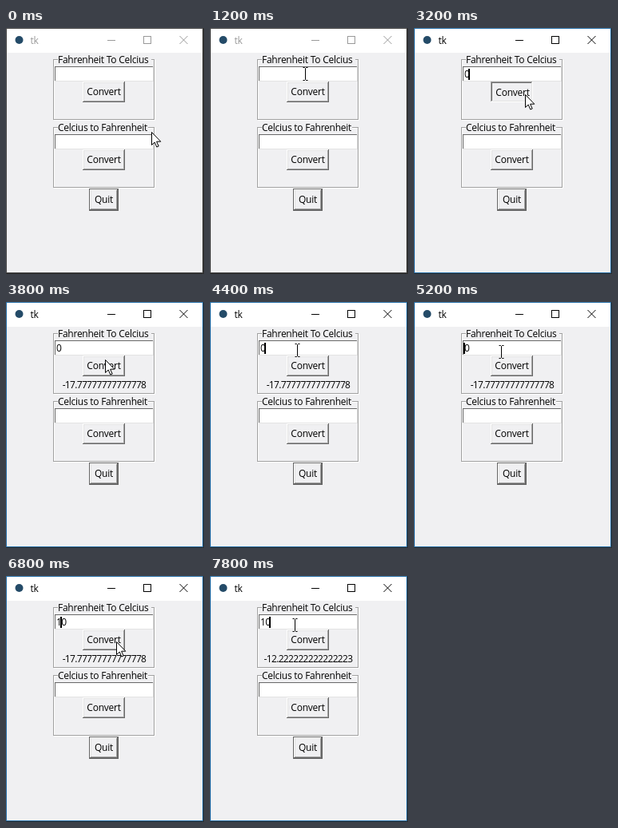
An HTML page that plays this animation: 248 by 308 pixels, repeating every 8 s.

```html
<!DOCTYPE html>
<html lang="en">
<head>
<meta charset="utf-8">
<title>tk</title>
<style>
  html, body { margin: 0; width: 100%; height: 100%; overflow: hidden; background: #2b2b2b; }
  svg { display: block; width: 248px; height: 308px; }
  text { font: 12px "Open Sans", "Noto Sans", sans-serif; letter-spacing: -0.25px; fill: #000; white-space: pre; }
  .digits { letter-spacing: -0.68px; }
  .mid { text-anchor: middle; }
  .chrome { fill: none; stroke: #999; }
  #title { fill: #999; }
  #edge { fill: #484848; }
  .active .chrome { stroke: #000; }
  .active #title { fill: #000; }
  .active #edge { fill: #2871aa; }
</style>
</head>
<body>
<svg id="stage" viewBox="0 0 248 308"></svg>
<script>
const LOOP = 8000, STEP = 200;
const FACE = '#f0f0f2', LIGHT = '#fff', SOFT = '#e3e3e3', SHADE = '#a0a0a0', DARK = '#696969';
const stage = document.getElementById('stage');

// Pointer path: time, x, y
const path = [
  [0, 182, 130], [1000, 119, 57], [2400, 119, 57], [3000, 139, 83],
  [3400, 139, 83], [4200, 109, 60], [4800, 109, 60], [5200, 109, 62],
  [6200, 109, 62], [6800, 138, 82], [7200, 138, 82], [7800, 106, 61]
];
// Entry state: time, text, caret index
const typing = [[0, '', -1], [2200, '0', 1], [5200, '0', 0], [5800, '10', 1], [7800, '10', 2]];
const results = [[0, ''], [3400, '-17.77777777777778'], [7200, '-12.222222222222223']];
const presses = [3200, 7000];

const box = (x, y, w, h, fill) =>
  `<rect x="${x}" y="${y}" width="${w}" height="${h}" fill="${fill}"/>`;

// One-pixel bevel: top-left and bottom-right sides of a rectangle
const bevel = (x, y, w, h, topLeft, bottomRight) =>
  box(x, y, w, 1, topLeft) + box(x, y, 1, h, topLeft) +
  box(x, y + h - 1, w, 1, bottomRight) + box(x + w - 1, y, 1, h, bottomRight);

const label = (x, y, str, cls = '') => `<text x="${x}" y="${y}" class="${cls}">${str}</text>`;

function button(x, y, w, h, str, down = false) {
  const [a, b, c, d] = down ? [SHADE, LIGHT, DARK, SOFT] : [LIGHT, DARK, SOFT, SHADE];
  const shift = down ? 1 : 0;
  return box(x, y, w, h, FACE) + bevel(x, y, w, h, a, b) + bevel(x + 1, y + 1, w - 2, h - 2, c, d) +
    label(x + w / 2 + shift, y + h / 2 + 4 + shift, str, 'mid');
}

function group(y, str, gap) {
  return bevel(60, y + 1, 127, 76, LIGHT, LIGHT) + bevel(59, y, 127, 76, SHADE, SHADE) +
    box(65, y - 6, gap, 13, FACE) + label(65, y + 5, str) +
    box(61, y + 9, 124, 19, '#fff') + bevel(61, y + 9, 124, 19, DARK, SOFT);
}

stage.innerHTML = `
  <rect id="edge" width="247" height="307"/>
  ${box(1, 1, 245, 30, '#fff')}${box(1, 31, 245, 275, FACE)}
  <circle cx="16.5" cy="15" r="5" fill="#244b68"/>
  <text id="title" x="30.5" y="20">tk</text>
  <path class="chrome" d="M127 15.5h10M172.5 10.5h9v9h-9z" shape-rendering="crispEdges"/>
  <path class="chrome" d="M217.5 10l10 10M227.5 10l-10 10"/>
  ${group(39, 'Fahrenheit To Celcius', 117)}
  ${group(124, 'Celcius to Fahrenheit', 113)}
  <g id="convert"></g>
  ${button(96, 152, 53, 26, 'Convert')}
  ${box(104, 201, 37, 28, '#646464')}${button(105, 202, 35, 26, 'Quit')}
  <text id="entry" class="digits" x="63" y="62"></text>
  <rect id="caret" y="51" width="2" height="14"/>
  <text id="result" class="digits mid" x="123" y="108"></text>
  <path id="arrow" d="M.5 .5v16l3.7-3.5 2.6 6 2.4-1-2.6-5.8h5.2z" fill="#fff" stroke="#000"/>
  <path id="beam" d="M-3-8h2l1 1 1-1h2M0-7v14M-3 8h2l1-1 1 1h2" fill="none" stroke="#000"/>`;

const el = id => document.getElementById(id);
const show = (id, on) => el(id).setAttribute('visibility', on ? 'visible' : 'hidden');
const latest = (table, t) => table.filter(row => row[0] <= t).pop();
const ease = p => p * p * (3 - 2 * p);

function pointerAt(t) {
  const a = latest(path, t), b = path[path.indexOf(a) + 1];
  if (!b) return a.slice(1);
  const p = ease((t - a[0]) / (b[0] - a[0]));
  return [1, 2].map(i => Math.round(a[i] + (b[i] - a[i]) * p));
}

const overEntry = (x, y) =>
  x >= 61 && x < 185 && [48, 133].some(top => y >= top && y < top + 19);

function draw(t) {
  stage.classList.toggle('active', t >= 1400);

  const [x, y] = pointerAt(t), beam = overEntry(x, y);
  show('beam', beam);
  show('arrow', !beam);
  el('beam').setAttribute('transform', `translate(${x + 0.5} ${y + 0.5})`);
  el('arrow').setAttribute('transform', `translate(${x} ${y})`);

  const [since, str, caret] = latest(typing, t);
  el('entry').textContent = str;
  el('caret').setAttribute('x', 62 + 6 * caret);
  show('caret', caret >= 0 && (t - since) % 900 < 600);

  el('result').textContent = latest(results, t)[1];
  el('convert').innerHTML = button(96, 67, 53, 26, 'Convert', presses.includes(t));
}

let last = -1;
function tick() {
  const t = Math.floor(performance.now() % LOOP / STEP) * STEP;
  if (t !== last) draw(last = t);
  requestAnimationFrame(tick);
}
tick();
</script>
</body>
</html>
```
